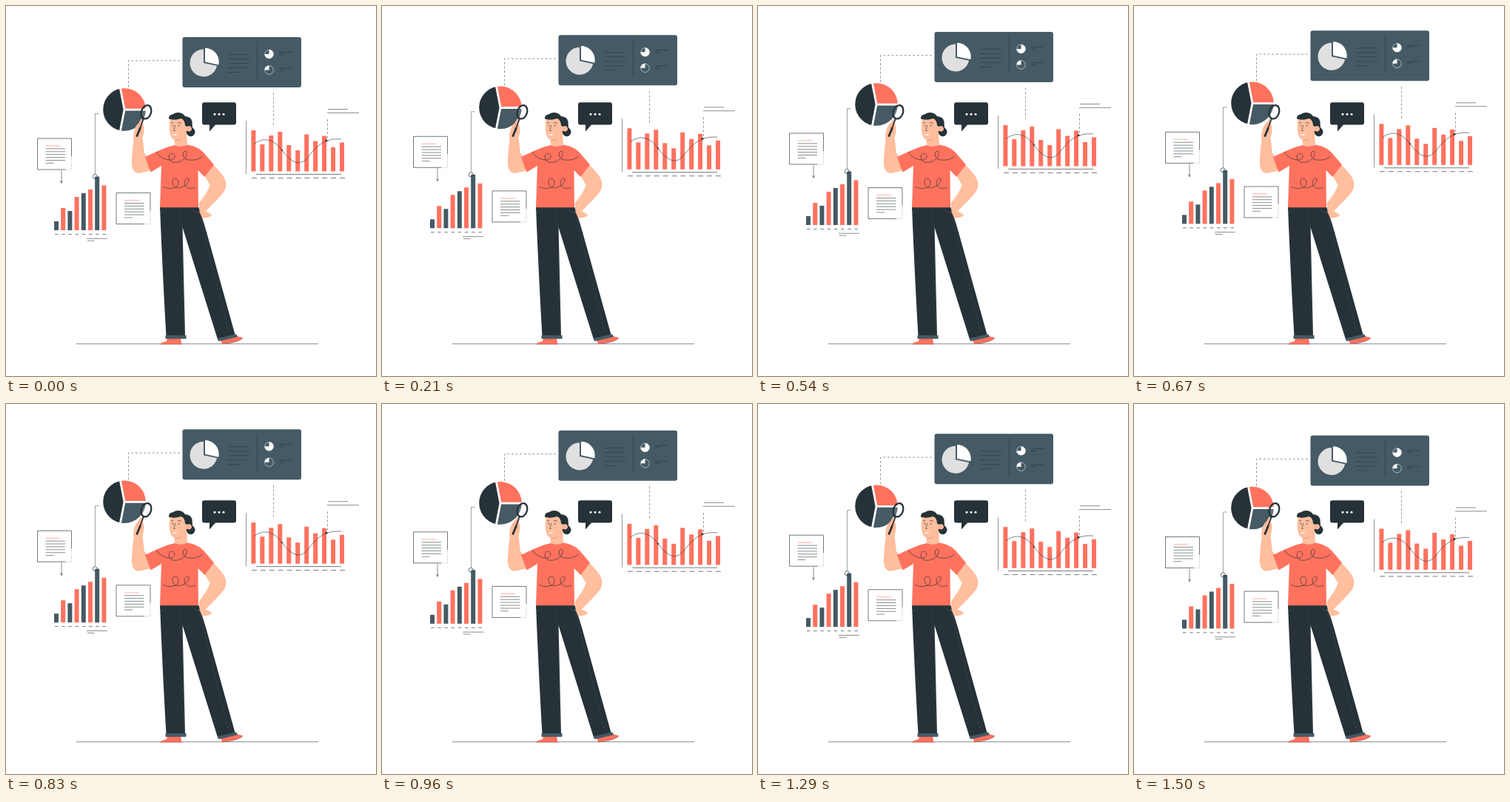
Recreate the animation shown at these times as an HTML page with a canvas. Size 500 by 500 pixels, loop 1540 ms.

```html
<!DOCTYPE html>
<html lang="en">
<head>
<meta charset="utf-8">
<title>Data analyst</title>
<style>
  html, body { margin: 0; width: 100%; height: 100%; overflow: hidden; background: #fff; }
  canvas { display: block; width: 500px; height: 500px; }
</style>
</head>
<body>
<canvas id="stage" width="500" height="500"></canvas>
<script>
const ctx = document.getElementById('stage').getContext('2d');
const CORAL = '#ff725e', DARK = '#263238', SLATE = '#455a64', SKIN = '#ffbe9d', GREY = '#e0e0e0', WHITE = '#fff';
const THIN = 0.55;
const DOTTED = [3, 2.7];
const LOOP = 1540, LOWEST = 715, RISE = 10, FPS = 24;

function fill(d, color) {
  ctx.fillStyle = color;
  ctx.fill(new Path2D(d));
}

function stroke(d, color = DARK, width = THIN, dash = []) {
  ctx.strokeStyle = color;
  ctx.lineWidth = width;
  ctx.setLineDash(dash);
  ctx.stroke(new Path2D(d));
  ctx.setLineDash([]);
}

function disc(x, y, r, color) {
  ctx.fillStyle = color;
  ctx.beginPath();
  ctx.arc(x, y, r, 0, Math.PI * 2);
  ctx.fill();
}

function ring(x, y, r, color, width = THIN) {
  ctx.strokeStyle = color;
  ctx.lineWidth = width;
  ctx.beginPath();
  ctx.arc(x, y, r, 0, Math.PI * 2);
  ctx.stroke();
}

// Angles in degrees, clockwise from the right.
function sector(x, y, r, from, to, color) {
  const rad = Math.PI / 180;
  ctx.fillStyle = color;
  ctx.beginPath();
  ctx.moveTo(x, y);
  ctx.arc(x, y, r, from * rad, to * rad);
  ctx.fill();
}

function roundRect(x, y, w, h, r, color) {
  ctx.fillStyle = color;
  ctx.beginPath();
  ctx.roundRect(x, y, w, h, r);
  ctx.fill();
}

const hline = (x1, x2, y, color, width, dash) => stroke(`M${x1} ${y}H${x2}`, color, width, dash);

function bars(x, step, base, tops, color) {
  tops.forEach((top, i) => {
    ctx.fillStyle = color(i);
    ctx.fillRect(x + i * step, top, 6, base - top);
  });
}

function note(x, y) {
  stroke(`M${x + 46} ${y + 24}V${y}H${x}V${y + 42}H${x + 38}`, DARK, 0.65);
  stroke(`M${x + 46} ${y + 24}V${y + 42}H${x + 38}`, DARK, 0.15);
  hline(x + 11, x + 31, y + 10, CORAL);
  for (let i = 1; i < 6; i++) hline(x + 11, x + 37.5, y + 10 + i * 3.9);
  hline(x + 11, x + 22, y + 33.3);
}

function drawPanel() {
  roundRect(238.5, 42, 160.5, 68, 3, SLATE);
  sector(267, 77, 18.5, 12, 270, GREY);
  sector(269, 75.5, 18.7, -90, 12, WHITE);
  for (let i = 0; i < 5; i++) hline(300, i < 4 ? 328.5 : 316, 65.5 + i * 6);
  stroke('M339.5 48V98');
  for (const y of [65, 86.5]) {
    ring(355.5, y, 5.8, WHITE);
    hline(369, 386, y - 2.7);
    hline(369, 376, y + 0.2);
  }
  sector(355.5, 65, 6, -90, 180, WHITE);
  sector(355.5, 86.5, 6, 180, 270, WHITE);
}

function drawPie() {
  const x = 160, y = 140, r = 28.8;
  sector(x, y, r, 101, 259, DARK);
  sector(x, y, r, -101, 0, CORAL);
  sector(x, y, r, 0, 101, SLATE);
  stroke(`M154 109L${x} ${y}L154 171M${x} ${y + 0.2}H191`, WHITE, 2.8);
}

function drawLeftChart() {
  bars(65, 9.2, 303, [291, 273, 277, 258, 253, 248, 230.5, 242.5], i => i % 2 ? CORAL : SLATE);
  hline(66, 135, 308.4, DARK, 0.65, [4.5, 4.7]);
  hline(109, 137, 314.3);
  hline(110, 119.5, 317.2);
  stroke('M125.5 145.5H120.5V227.5', DARK, 0.45);
  ring(120.3, 230.5, 3, DARK, 0.7);
}

function drawRightChart() {
  bars(331.4, 11.96, 223.5, [168, 187, 175, 170, 188, 195, 173.5, 182.5, 175.5, 191, 184.5], () => CORAL);
  stroke('M324.5 155V227', DARK, 0.5);
  hline(338, 453, 227.4, DARK, 0.65);
  hline(332, 459, 232.4, DARK, 0.65, [7, 4.9]);
  stroke('M335 187C345 178 360 177 373 195C385 211 397 219 409 203C420 189 431 178 453 180', DARK, 0.6);
  disc(373, 195, 1.1, DARK);
  disc(433, 182, 1.4, DARK);
  hline(435, 462, 139.5);
  hline(434, 477, 144.4);
}

function drawFloating() {
  stroke('M165.5 110V73.8H235M361.5 117.5V163M434.5 153V182', DARK, 0.5, DOTTED);
  drawPanel();
  drawPie();
  drawLeftChart();
  drawRightChart();
  note(42.5, 179);
  note(149, 252.6);
  stroke('M75 222V239M73.5 236L75 239.5L76.3 236');
}

function drawBubble() {
  roundRect(265, 130.2, 46, 30.4, 3, DARK);
  fill('M275 160V169.5L283.5 160Z', DARK);
  for (const x of [282, 288, 294]) disc(x, 146.2, 1.5, WHITE);
}

function drawLegs() {
  fill('M218 449H236L237.5 457.3H208Q209 455 217 453Z', CORAL);
  fill('M290 450L308 446.5Q318 446.5 320 448.5Q318 452 306 455L292 457Z', CORAL);
  stroke('M208 457H237.5M292 457L306 455Q318 452 320 448.5', DARK, 0.3);
  fill('M208 271.5H260Q267 290 275 320L309.5 444L286.5 452L238.5 299L242 446H216.5Q212 370 208 271.5Z', DARK);
  fill('M215.5 445H243.5V449.8H215.5Z', SLATE);
  fill('M286 449L311 443.5L313.5 447L288 453Z', SLATE);
  stroke('M235 273Q234 288 238.5 299L239.5 440M260 276L301 443', SLATE, 0.5, [2, 1.5]);
  stroke('M209 280Q216 279 217 273M251 273Q253 279 262 279', SLATE, 0.5);
}

function drawArms() {
  fill('M172.5 180C171.5 170 174 163 179 158.5L182.5 152.5Q185.5 152 184.5 158Q188.5 167 184.5 178L187 199L191 204L196 222Q187 224.5 179 226Q170 225 169.8 211Q170.3 196 172.5 180Z', SKIN);
  fill('M279 214Q299.5 232 297.3 244Q296 251 286 261L269 278L278 282Q277 285.5 268 286.5L261 278L261 266Q270 256 275.8 242L268 229Z', SKIN);
}

function drawShirt() {
  fill('M188 204Q205 195.5 218 190.7L228 188Q236 191 245 187.5Q260 190 267 198L281 214.5L268.5 231L259.5 222L260 272.3H208L210 216L195.5 224.5Z', CORAL);
  stroke('M203 197C211 210 228 211 228 203C228 198 220 198 220 204C221 215 237 212 242 205C246 199 244 195 241 196.5C237 200 240 208 247 208C256 209 260 207 266 203', DARK, 0.65);
  stroke('M212 244C218 248 233 248 233 239C233 231 224 231 225 239C226 248 239 247 245 240C250 234 246 231 242 235C239 241 244 250 256 245', DARK, 0.65);
}

function drawHead() {
  fill('M228 176V188Q236 191 245 187.5L244 170Z', SKIN);
  fill('M221.5 152L242 150L246.5 162L244 177Q238 182.5 229 181.5Q223 180 222 173L220.5 167Z', SKIN);
  stroke('M228 181.8Q234 182 238 179', CORAL, 0.6);
  fill('M220 152.5Q219.5 147 225.5 146.2Q231 142.5 237 144.7Q240 146 242 149Q250 149.5 251.5 156L252 164.5Q255.7 166.5 255.5 171Q254 176.3 249 176.3Q244 175 243.8 170L246.5 164L242 161.5Q242 154 236.5 152Q227 155 220 152.5Z', DARK);
  disc(247.3, 165.8, 3.6, SKIN);
  stroke('M245.7 167Q246 164 248.5 164.5', CORAL, 0.5);
  disc(225.5, 161.8, 0.75, DARK);
  disc(233.7, 161.8, 0.75, DARK);
  stroke('M222.8 158.2L226.3 157.5M231.8 157.8Q234 156.8 237 158.7M228.8 161L226.8 168.5H228.8', DARK, 0.65);
  fill('M225 173Q228 174.3 231.5 172.7Q230.5 175.3 228 175.3Q226 175 225 173Z', WHITE);
}

function drawMagnifier() {
  ctx.strokeStyle = DARK;
  ctx.lineWidth = 2.3;
  ctx.beginPath();
  ctx.ellipse(189.5, 143.3, 6.5, 9.4, 0.33, 0, Math.PI * 2);
  ctx.fillStyle = 'rgba(255,255,255,.12)';
  ctx.fill();
  ctx.stroke();
  stroke('M186 152L181.5 164', DARK, 1.8);
  ctx.lineCap = 'round';
  stroke('M181.3 165L177 175.5', DARK, 2.8);
  ctx.lineCap = 'butt';
  stroke('M180 157.5L178 165M184 160L182 171', CORAL, 0.4);
}

// Vertical triangle wave, advanced in 24 fps steps.
function floatOffset(ms) {
  const step = Math.floor((Math.floor(ms / 10) * 10 + 4.9) * FPS / 1000);
  const gap = Math.abs(step * 1000 / FPS - LOWEST);
  const distance = Math.min(gap, LOOP - gap);
  return (distance - LOWEST) * RISE / (LOOP / 2);
}

function draw(ms) {
  ctx.fillStyle = WHITE;
  ctx.fillRect(0, 0, 500, 500);
  hline(95, 422, 456.6);
  ctx.save();
  ctx.translate(0, floatOffset(ms));
  drawFloating();
  ctx.restore();
  drawBubble();
  drawArms();
  drawLegs();
  drawShirt();
  fill('M261 277Q267 275 277.5 281.5Q276 285 265 286.5Z', SKIN);
  drawHead();
  drawMagnifier();
}

const start = performance.now();
function tick() {
  draw((performance.now() - start) % LOOP);
  requestAnimationFrame(tick);
}
tick();
</script>
</body>
</html>
```
